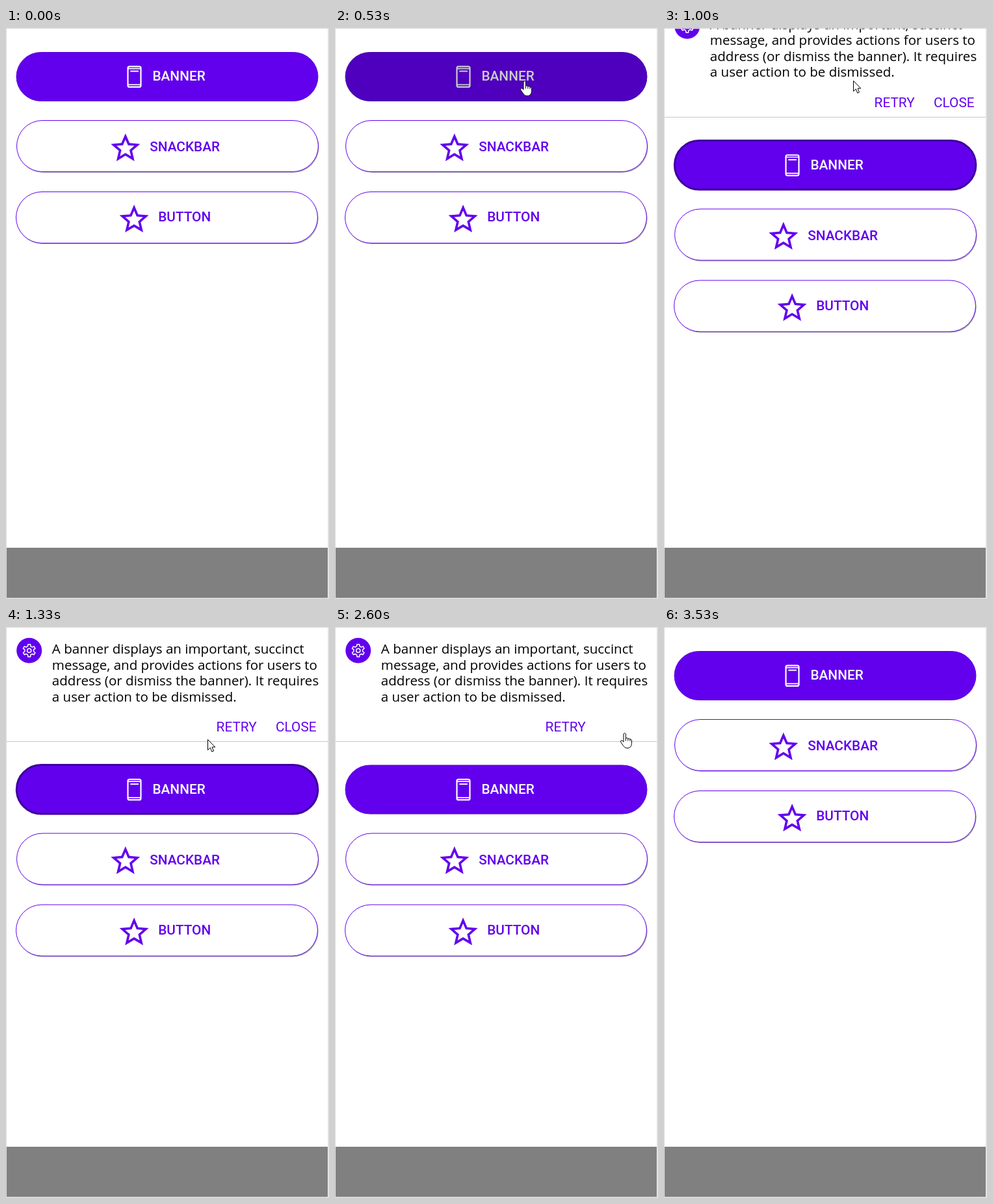
Animation, 497 px wide and 880 px high, one loop 4070 ms. Source, as an HTML page:

```html
<!DOCTYPE html>
<html lang="en">
<head>
<meta charset="utf-8">
<title>Banner demo</title>
<style>
  html, body { margin: 0; width: 100%; height: 100%; overflow: hidden; background: #fff; }
  svg { display: block; width: 497px; height: 880px; }
  .label { font: 500 20.8px Roboto, sans-serif; }
  .action { font: 400 20.8px Roboto, sans-serif; fill: #6200ee; }
  .message { font: 400 20.55px "Open Sans", sans-serif; fill: #000; }
</style>
</head>
<body>
<svg viewBox="0 0 497 880">
  <defs>
    <path id="star" transform="scale(2.25)" fill="#6200ee" d="M22 9.24l-7.19-.62L12 2 9.19 8.63 2 9.24l5.46 4.73L5.82 21 12 17.27 18.18 21l-1.63-7.03L22 9.24zM12 15.4l-3.76 2.27 1-4.28-3.32-2.88 4.38-.38L12 6.1l1.71 4.04 4.38.38-3.32 2.88 1 4.28L12 15.4z"/>
    <filter id="soft" x="-5%" y="-10%" width="110%" height="125%"><feGaussianBlur stdDeviation=".7"/></filter>
  </defs>
  <rect width="497" height="880" fill="#fff"/>

  <g id="panel">
    <circle cx="35.7" cy="36.3" r="19.5" fill="#6200ee"/>
    <g fill="none" stroke="#fff" stroke-width="1.5" stroke-linejoin="round" transform="translate(35.7 36.3)">
      <path id="gear"/>
      <circle r="3.1"/>
    </g>
    <g class="message">
      <text x="70.8" y="41">A banner displays an important, succinct</text>
      <text x="70.8" y="65.5">message, and provides actions for users to</text>
      <text x="70.8" y="90">address (or dismiss the banner). It requires</text>
      <text x="70.8" y="114.5">a user action to be dismissed.</text>
    </g>
    <text class="action" x="323.6" y="161" id="retry">RETRY</text>
    <text class="action" x="415" y="161" id="close">CLOSE</text>
    <rect x="1" y="176" width="494" height="1" fill="#c8c8c8"/>
  </g>

  <g id="list">
    <g id="banner">
      <rect x="16" y="37.5" width="464" height="75" rx="37.5" fill="#6200ee" stroke="#5800d4"/>
      <rect id="focus" x="16.3" y="37" width="463.6" height="75.6" rx="37.8" fill="none" stroke="#3f009c" stroke-width="3"/>
      <g fill="none" stroke="#fff" stroke-width="2">
        <rect x="187.5" y="59.3" width="20" height="31.6" rx="2.5" stroke-width="2.2"/>
        <path d="M188 62.6H207M188 87.4H207" stroke-width="1.6"/>
        <path d="M191.3 66.6H204"/>
      </g>
      <text class="label" x="225.4" y="81.4" fill="#fff">BANNER</text>
    </g>
    <rect x="17.7" y="144" width="464" height="79" rx="39.5" fill="#000" opacity=".33" filter="url(#soft)"/>
    <g id="snackbar">
      <rect x="16.5" y="142.5" width="464" height="79" rx="39.5" fill="#fff" stroke="#6200ee"/>
      <use href="#star" x="0" y="0" transform="translate(156.8 157.9)"/>
      <text class="label" x="221.2" y="190.2" fill="#6200ee">SNACKBAR</text>
    </g>
    <rect x="16.7" y="254" width="464" height="79" rx="39.5" fill="#000" opacity=".33" filter="url(#soft)"/>
    <g id="button">
      <rect x="15.5" y="252.5" width="464" height="79" rx="39.5" fill="#fff" stroke="#6200ee"/>
      <use href="#star" transform="translate(170.1 267.8)"/>
      <text class="label" x="234.2" y="298.4" fill="#6200ee">BUTTON</text>
    </g>
  </g>

  <rect x="1" y="801" width="494" height="77.5" fill="#808080"/>
  <path d="M0 0H497V880H0ZM1 1.3V878.5H495.3V1.3Z" fill="#dedede" fill-rule="evenodd"/>

  <g id="cursor" fill="#fff" stroke="#000" stroke-linejoin="round">
    <path id="arrow" d="M.5.5V16.6L4.3 13.1 6.8 19.2 9.5 18 7 12.1H11.8Z"/>
    <g id="hand">
      <path d="M-1 1.8Q.7-.9 2.4 1.8V8.4Q4.2 7 5.8 9Q7.6 8 9 10Q11 9.5 11.5 11.6V16.5Q11 23.4 5 23.7Q1 23.7-1.2 20.4L-5.3 14.4Q-6 12-4 11.8Q-2.3 12-1 14.2Z"/>
      <path d="M2.4 8.4V12.4M5.8 9V12.6M9 10V13" fill="none"/>
    </g>
  </g>
</svg>
<script>
const LOOP = 4070, STEP = 200 / 3, PANEL_HEIGHT = 175.5;
const PRESS = 800, DISMISS = 2600, GONE = 2700;
const el = id => document.getElementById(id);
const show = (id, on) => el(id).style.display = on ? "" : "none";
const mix = (a, b, p) => a + (b - a) * p;
const clamp = v => Math.min(1, Math.max(0, v));
const smooth = p => p * p * (3 - 2 * p);

// Six-toothed gear outline
function gearPath() {
  const points = [];
  for (let i = 0; i < 6; i++) {
    for (const [turn, r] of [[-18, 7], [-11, 9.8], [11, 9.8], [18, 7]]) {
      const a = (i * 60 + turn) * Math.PI / 180;
      points.push((r * Math.sin(a)).toFixed(2) + " " + (-r * Math.cos(a)).toFixed(2));
    }
  }
  return "M" + points.join("L") + "Z";
}
el("gear").setAttribute("d", gearPath());

function panelOffset(t) {
  if (t < PRESS || t >= GONE) return 0;
  return PANEL_HEIGHT * (1 - (1 - clamp((t - PRESS) / 510)) ** 3);
}

// Pointer hot spot, or null while it is off stage
function pointer(n) {
  if (n < 1 || n > 52) return null;
  if (n <= 8) {
    const rest = ((8 - n) / 7) ** 2;
    return [mix(291, 360, rest), mix(81, 345, rest)];
  }
  if (n <= 19) {
    const p = smooth(clamp((n - 15) / 4));
    return [mix(291, 304, p), mix(81, 173, p)];
  }
  if (n <= 46) {
    const p = smooth(clamp((n - 19) / 8));
    return [mix(304, 445, p), mix(173, 163, p)];
  }
  const p = (n - 46) / 6;
  return [mix(445, 6, p ** 2.4), mix(163, 816, p ** 2.07)];
}

function draw(time) {
  const n = Math.min(60, Math.floor((time % LOOP + 4) / STEP));
  const t = n * STEP + 1;
  const off = panelOffset(t);
  const open = off > 0;
  const at = pointer(n);
  const inside = (x0, y0, x1, y1) => !!at && at[0] >= x0 && at[0] <= x1 && at[1] >= y0 && at[1] <= y1;

  show("panel", open);
  el("panel").setAttribute("transform", `translate(0 ${off - PANEL_HEIGHT})`);
  el("list").setAttribute("transform", `translate(0 ${off})`);
  show("focus", t >= PRESS && t < DISMISS);

  let hot = false;
  const settled = t < GONE || t >= 2800;
  for (const [id, top, bottom] of [["banner", 37, 113], ["snackbar", 142, 222], ["button", 252, 332]]) {
    const over = inside(16, top + off, 480, bottom + off);
    hot = hot || over;
    el(id).style.filter = over && settled ? "brightness(.8)" : "none";
  }
  for (const [id, left, right] of [["retry", 318, 392], ["close", 410, 484]]) {
    const over = open && inside(left, off - 35, right, off - 7);
    hot = hot || over;
    el(id).style.opacity = over ? .7 : 1;
  }
  show("close", t < DISMISS);
  if (open && t >= DISMISS) hot = true;

  show("cursor", at);
  if (at) {
    el("cursor").setAttribute("transform", `translate(${Math.round(at[0])} ${Math.round(at[1])})`);
    show("hand", hot);
    show("arrow", !hot);
  }
}

const start = performance.now();
function tick() {
  draw(performance.now() - start);
  requestAnimationFrame(tick);
}
tick();
</script>
</body>
</html>
```
